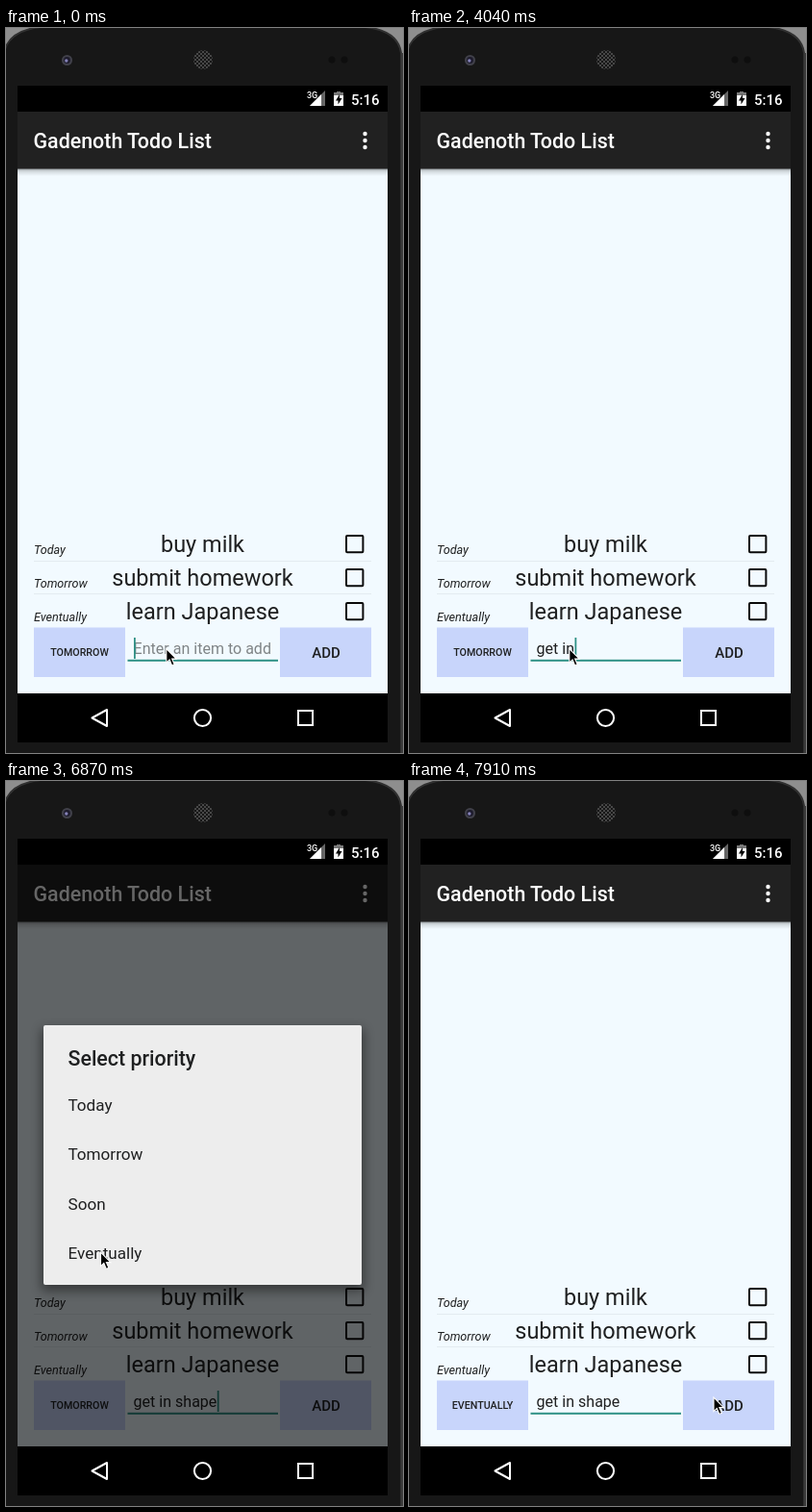
Recreate the animation shown at these times as an HTML page. Size 413 px wide and 754 px high, loop 8 s.

```html
<!DOCTYPE html>
<html lang="en">
<head>
<meta charset="utf-8">
<title>Todo list</title>
<style>
html, body { margin: 0; width: 100%; height: 100%; overflow: hidden; background: #151515; }
svg { display: block; width: 100%; height: 100%; }
text { font-family: Roboto, sans-serif; font-size: 17.1px; fill: #1f2021; white-space: pre; }
.medium { font-weight: 500; }
.title { font-size: 21.4px; }
.item { font-size: 23.5px; text-anchor: middle; }
.when { font-size: 12.6px; font-style: italic; }
.button { font-size: 10.7px; text-anchor: middle; }
.field { font-size: 16.04px; }
.line { fill: none; stroke: #fff; stroke-width: 2; }
</style>
</head>
<body>
<svg viewBox="0 0 413 754">
  <defs>
    <linearGradient id="barShadow" x2="0" y2="1">
      <stop offset="0" stop-color="#000" stop-opacity=".38"/>
      <stop offset=".4" stop-color="#000" stop-opacity=".13"/>
      <stop offset="1" stop-color="#000" stop-opacity="0"/>
    </linearGradient>
    <pattern id="mesh" width="4" height="4" patternUnits="userSpaceOnUse">
      <rect width="4" height="4" fill="#171717"/>
      <circle cx="1" cy="1" r="1" fill="#585858"/>
      <circle cx="3" cy="3" r="1" fill="#585858"/>
    </pattern>
    <filter id="soft" x="-10%" y="-10%" width="120%" height="125%">
      <feGaussianBlur stdDeviation="6"/>
    </filter>
  </defs>

  <!-- phone -->
  <rect width="413" height="754" fill="#8e8e8e"/>
  <path d="M-2 756V26Q2 3 36-1H374Q408 3 411 26V756Z" fill="#171717" stroke="#303030" stroke-width="2"/>
  <path d="M411 26H413V754H411Z" fill="#3a3a3a"/>
  <circle cx="63.5" cy="33.5" r="5.5" fill="#41414a"/>
  <circle cx="63.5" cy="33.5" r="3.4" fill="#1d1b2c"/>
  <circle cx="62.8" cy="34" r="1.7" fill="#8582b8"/>
  <circle cx="205" cy="33" r="10" fill="url(#mesh)"/>
  <circle cx="339" cy="33" r="3.5" fill="#0e0e0e"/>
  <circle cx="352" cy="33" r="3.5" fill="#0e0e0e"/>
  <rect x="12" y="60" width="385" height="683"/>

  <!-- status bar -->
  <text class="medium" x="313" y="73" style="font-size:9px;fill:#fff">3G</text>
  <path d="M316 81L332 65V81Z" fill="#666"/>
  <path d="M316 81L328 69V81Z" fill="#fff"/>
  <path d="M341 67.5H344V66H348V67.5H351V81H341Z" fill="#fff"/>
  <path d="M341 67.5H344V66H348V67.5H351V70H341Z" fill="#777"/>
  <path d="M347 69L343 75.5H345.5V79.5L349.5 73H347Z"/>
  <text class="medium" x="359" y="79.5" style="font-size:15px;fill:#fff">5:16</text>

  <!-- app -->
  <rect x="12" y="146" width="385" height="546" fill="#f2faff"/>
  <rect x="12" y="146" width="385" height="8" fill="url(#barShadow)"/>
  <rect x="12" y="87" width="385" height="59.5" fill="#212121"/>
  <text class="medium title" x="28.5" y="125" style="fill:#fff">Gadenoth Todo List</text>
  <g fill="#fff">
    <circle cx="373.5" cy="110" r="2.2"/>
    <circle cx="373.5" cy="117" r="2.2"/>
    <circle cx="373.5" cy="124" r="2.2"/>
  </g>
  <path d="M29 554.5H380M29 588.5H380" stroke="#e3ebf0"/>
  <g id="rows"></g>
  <path d="M29 623.5H124V675H29ZM285 623.5H380V675H285Z" fill="#c8d5fb"/>
  <text id="priority" class="medium button" x="76.5" y="653"></text>
  <text class="medium button" x="333" y="654.8" style="font-size:15px">ADD</text>
  <text id="hint" class="field" x="132.6" y="651.3" style="fill:#7f8486">Enter an item to add</text>
  <text id="entry" class="field" x="132.6" y="651.3"></text>
  <rect x="126.5" y="656.8" width="156.5" height="2" fill="#2f9186"/>
  <rect id="caret" y="634" width="1.8" height="22" fill="#2f9186"/>

  <!-- dialog -->
  <rect id="dim" x="12" y="87" width="385" height="605"/>
  <g id="dialog">
    <rect x="37" y="258" width="335" height="272" opacity=".45" filter="url(#soft)"/>
    <rect x="39" y="254" width="331" height="270" rx="2" fill="#ededed"/>
    <rect id="picked" x="39" y="465" width="331" height="51" fill-opacity=".14"/>
    <text class="medium title" x="64.5" y="296">Select priority</text>
    <g id="options"></g>
  </g>

  <!-- navigation -->
  <g class="line">
    <path d="M89.5 717.5L105 709V726Z" stroke-linejoin="round"/>
    <circle cx="204.5" cy="717.5" r="8.6"/>
    <rect x="304" y="710" width="15" height="15"/>
  </g>

  <path id="mouse" d="M0 0V14.6L3.3 11.5L5.8 17.4L8.4 16.3L5.9 10.6H10.4Z" stroke="#fff" stroke-width="1.1"/>
</svg>
<script>
const LOOP = 8000;
const el = id => document.getElementById(id);
const set = (node, attrs) => {
  for (const key in attrs) node.setAttribute(key, attrs[key]);
  return node;
};
const add = (parent, tag, attrs, text = '') => {
  const node = document.createElementNS('http://www.w3.org/2000/svg', tag);
  node.textContent = text;
  return parent.appendChild(set(node, attrs));
};

[['Today', 'buy milk'], ['Tomorrow', 'submit homework'], ['Eventually', 'learn Japanese']]
  .forEach(([when, item], i) => {
    const y = 536.5 + i * 35, rows = el('rows');
    add(rows, 'text', { class: 'when', x: 29, y: y + 10.7 }, when);
    add(rows, 'text', { class: 'item', x: 204.5, y: y + 8.2 }, item);
    add(rows, 'rect', { x: 354, y: y - 8.6, width: 17.4, height: 17.4, rx: 1,
      fill: 'none', stroke: '#0a0a0a', 'stroke-width': 2 });
  });
['Today', 'Tomorrow', 'Soon', 'Eventually'].forEach((name, i) =>
  add(el('options'), 'text', { x: 64.5, y: 343 + i * 51.3 }, name));

// Each table holds [start in ms, value...] and keeps its value until the next start.
const phrase = 'get in shape';
const typed = [[0, 0], [3300, 1], [3450, 3], [3750, 4], [3900, 5], [4040, 6],
  [4190, 7], [4340, 8], [4490, 10], [4640, 11], [4790, 12]];
const blink = [[0, 1], [450, 0], [900, 1], [1350, 0], [1950, 1], [2400, 0], [3000, 1],
  [5380, 0], [5830, 1], [7760, 0]];
const pointer = [[0, 166.8, 645.5], [5230, 158, 646], [5380, 138, 647], [5530, 108, 647],
  [5680, 88, 646], [5830, 82.8, 646], [6420, 84, 618], [6570, 91, 548], [6720, 97, 486],
  [6870, 98.5, 490], [7310, 104, 494], [7460, 152, 532], [7610, 236, 596],
  [7760, 302, 636], [7910, 317, 641]];
const overlay = [[0, 0, 0], [6120, 0.3, 0.5], [6270, 0.6, 1], [7160, 0.355, 0.1], [7310, 0, 0]];

const at = (table, t) => table.findLast(row => row[0] <= t).slice(1);

function draw(t) {
  const [count] = at(typed, t);
  const [x, y] = at(pointer, t);
  const [dim, dialog] = at(overlay, t);
  const chosen = t >= 7160;
  const entry = el('entry');
  entry.textContent = phrase.slice(0, count);
  el('hint').style.display = count ? 'none' : '';
  set(el('caret'), { x: 133 + (count && entry.getComputedTextLength()), opacity: at(blink, t)[0] });
  el('priority').textContent = chosen ? 'EVENTUALLY' : 'TOMORROW';
  set(el('dim'), { opacity: dim });
  set(el('dialog'), { opacity: dialog });
  set(el('picked'), { opacity: +chosen });
  set(el('mouse'), { transform: `translate(${x} ${y})` });
}

const start = performance.now();
function tick() {
  draw((performance.now() - start) % LOOP);
  requestAnimationFrame(tick);
}
tick();
</script>
</body>
</html>
```
